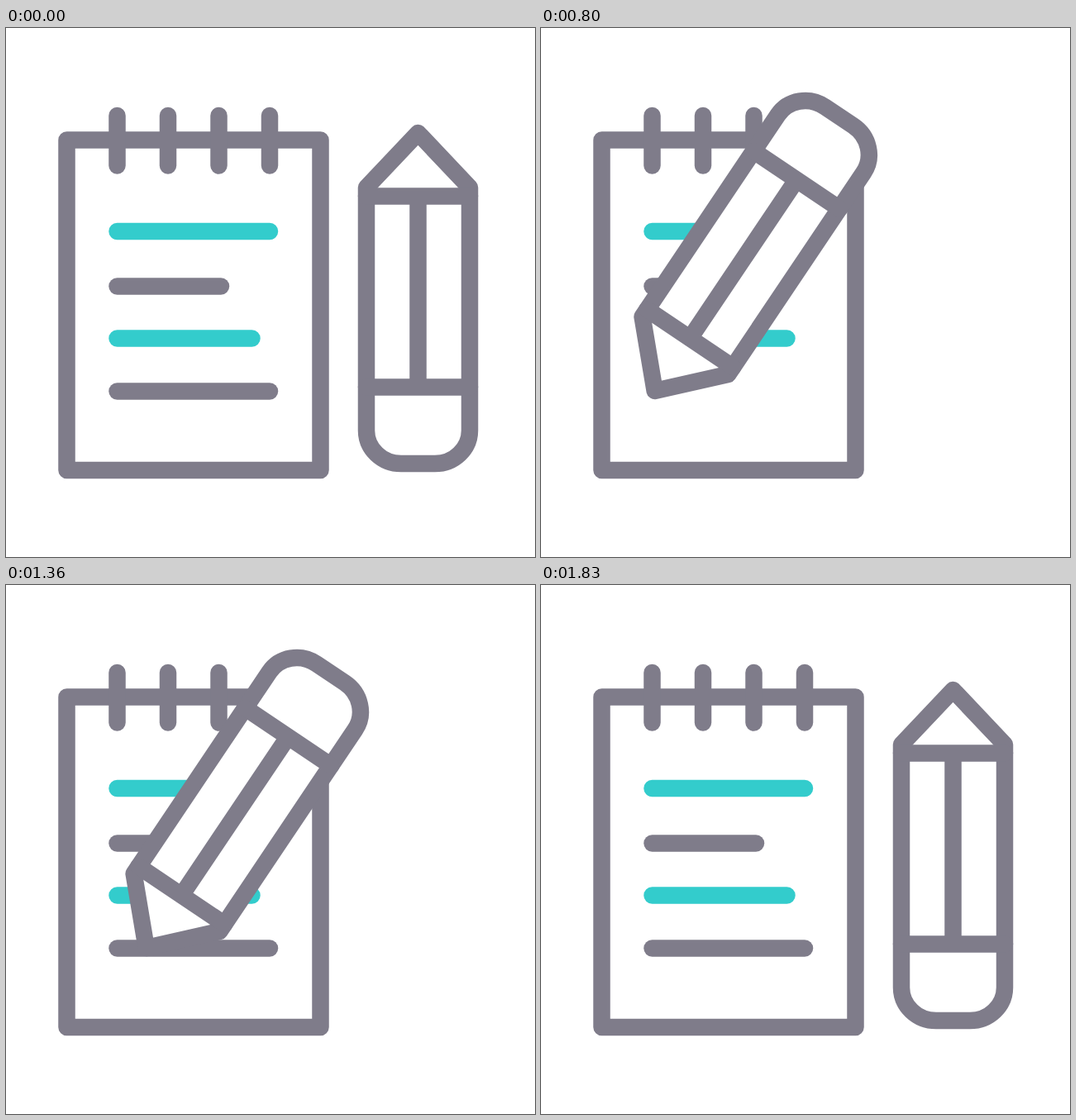
Animation of 640 by 640 pixels, one loop 2.36 s. Source, as an HTML page:

```html
<!DOCTYPE html>
<html lang="en">
<head>
<meta charset="utf-8">
<title>Notepad and pencil</title>
<style>
  html, body { margin: 0; height: 100%; overflow: hidden; background: #fff; }
  svg { display: block; width: 100%; height: 100%; }
  path { fill: none; stroke: #7f7c8a; stroke-width: 20.5; stroke-linecap: round; stroke-linejoin: round; }
  .accent { stroke: #33cccc; }
  .body { fill: #fff; }
</style>
</head>
<body>
<svg viewBox="0 0 640 640">
  <path d="M73.5 135.5H380.5V535H73.5Z"/>
  <path d="M134.5 106V166.5M196 106V166.5M257.5 106V166.5M319 106V166.5"/>
  <path class="accent" d="M134.5 246H319M134.5 375.5H297.5"/>
  <path d="M134.5 312.5H260"/>
  <path id="line"/>
  <g id="pencil">
    <path class="body" d="M0 -200L62.5 -134V160A42 40 0 0 1 20.5 200H-20.5A42 40 0 0 1 -62.5 160V-134Z"/>
    <path d="M-62.5 -123.5H62.5M-62.5 107.5H62.5M0 -123.5V107.5"/>
  </g>
</svg>
<script>
const LOOP = 2360, FPS = 30;
const REST = [498.5, 327], WRITE = [215.6, 272.9];
const TILT = -146.1, REACH = 151;
const LINE_START = 134.5, LINE_LENGTH = 184.5;
const line = document.getElementById('line');
const pencil = document.getElementById('pencil');

// Progress from 0 to 1 between two steps.
const span = (step, from, to) => Math.min(1, Math.max(0, (step - from) / (to - from)));

// Point on a cubic Bezier curve.
const curve = (t, a, b, c, d) => [0, 1].map(i =>
  (1 - t) ** 3 * a[i] + 3 * t * (1 - t) ** 2 * b[i] + 3 * t * t * (1 - t) * c[i] + t ** 3 * d[i]);

function draw(time) {
  const step = Math.floor((time + 8) * FPS / 1000);
  const arrive = span(step, 9, 21);
  const slide = span(step, 21, 34.5) - span(step, 34.5, 46);
  const leave = span(step, 46, 55);
  const [x, y] = leave > 0
    ? curve(leave, WRITE, [258, 274], [431, 312], REST)
    : curve(arrive, REST, [423, 317], [300, 274], WRITE);
  pencil.setAttribute('transform',
    `translate(${x + REACH * slide} ${y}) rotate(${TILT * (arrive - leave)})`);

  const drawn = 1 - span(step, 12.9, 24.1) + span(step, 24.1, 33.3);
  line.setAttribute('d', drawn > 0.01 ? `M${LINE_START} 439.5h${LINE_LENGTH * drawn}` : '');
}

const start = performance.now();
function tick() {
  draw((performance.now() - start) % LOOP);
  requestAnimationFrame(tick);
}
tick();
</script>
</body>
</html>
```
